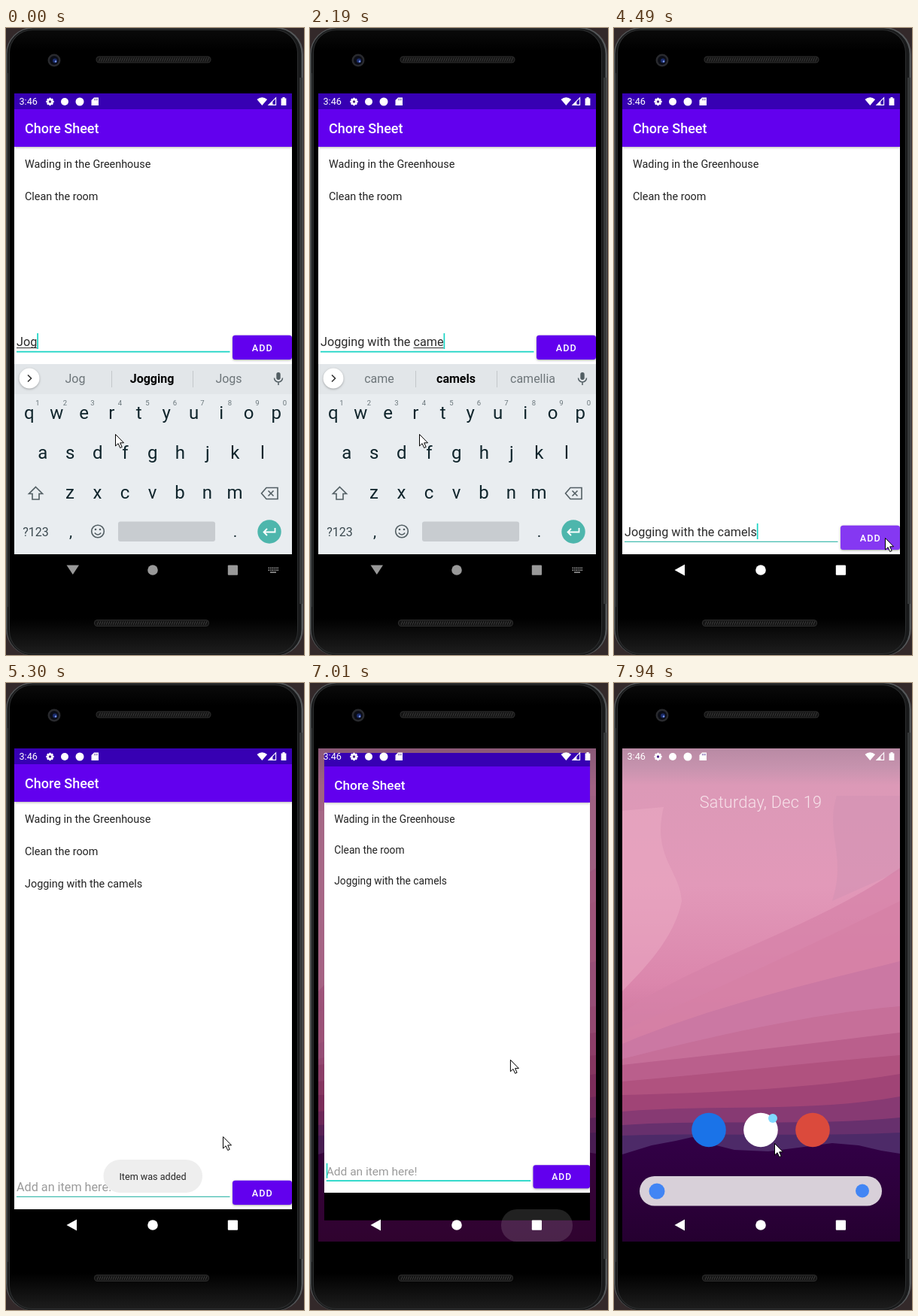
Recreate the animation shown at these times as an HTML page with a canvas. Size 396 by 834 pixels, loop 8000 ms.

```html
<!DOCTYPE html>
<html lang="en">
<head>
<meta charset="utf-8">
<title>Todo app demo</title>
<style>
html, body { margin: 0; width: 100%; height: 100%; overflow: hidden; background: #000; }
canvas { display: block; }
</style>
</head>
<body>
<canvas id="stage" width="396" height="834"></canvas>
<script>
const ctx = document.getElementById('stage').getContext('2d');
const LOOP = 8000;
const TITLE = 'Chore Sheet';
const SENTENCE = 'Jogging with the camels';
const ITEMS = ['Wading in the Greenhouse', 'Clean the room'];
const ALTERNATIVES = { Jogging: 'Jogs', with: 'within', the: 'then', camels: 'camellia' };

// Screen updates come in bursts: [first, last, count]
const BURSTS = [[0, 0, 1], [120, 1050, 8], [1200, 2190, 8], [2340, 2460, 2], [3010, 3940, 8],
  [4060, 4210, 2], [4490, 5420, 8], [5540, 6500, 8], [6620, 7640, 9], [7790, 7940, 2]];

const POINTER = [[2460, 145, 540], [3010, 142, 552], [3143, 132, 600], [3276, 112, 685], [3409, 103, 713],
  [3674, 103, 713], [3807, 190, 700], [3940, 284, 680], [4060, 340, 674], [4210, 360, 678],
  [4888, 360, 678], [5020, 335, 645], [5287, 288, 603], [5420, 295, 656], [5680, 308, 750],
  [5880, 313, 816], [6200, 306, 765], [6500, 300, 722], [6747, 300, 722], [6875, 292, 630], [7002, 266, 501],
  [7130, 235, 455], [7257, 210, 430], [7385, 206, 393], [7512, 204, 323], [7640, 206, 240],
  [7790, 211, 480], [7940, 213, 612]];
// time, scale, top of the app bar
const CARD = [[6875, 1, 108], [7002, .958, 111], [7130, .82, 138], [7257, .68, 166],
  [7385, .629, 172], [7512, .629, 104], [7640, .629, -130], [7790, .629, -400]];

function hold(time) {
  const [first, last, count] = BURSTS.findLast(b => b[0] <= time);
  const step = (last - first) / (count - 1 || 1) || 1;
  return Math.min(last, first + Math.floor((time - first + 36) / step) * step);
}

function tween(keys, t) {
  const i = keys.findIndex(k => k[0] > t);
  if (i === 0) return keys[0].slice(1);
  if (i < 0) return keys.at(-1).slice(1);
  const [a, b] = [keys[i - 1], keys[i]];
  const p = (t - a[0]) / (b[0] - a[0]);
  return a.slice(1).map((v, n) => v + (b[n + 1] - v) * p);
}

const ramp = (t, from, to) => Math.max(0, Math.min(1, (t - from) / (to - from)));

function layer(alpha, draw) {
  ctx.save();
  ctx.globalAlpha *= alpha;
  draw();
  ctx.restore();
}

function box(x, y, w, h, color, r = 0) {
  ctx.fillStyle = color;
  ctx.beginPath();
  ctx.roundRect(x, y, w, h, r);
  ctx.fill();
}

function disc(x, y, r, color) {
  ctx.fillStyle = color;
  ctx.beginPath();
  ctx.arc(x, y, r, 0, 7);
  ctx.fill();
}

function fillPath(d, color) {
  ctx.fillStyle = color;
  ctx.fill(new Path2D(d));
}

function strokePath(d, color, width = 1.6) {
  ctx.strokeStyle = color;
  ctx.lineWidth = width;
  ctx.stroke(new Path2D(d));
}

function text(s, x, y, size, color, align = 'left', weight = 400, spacing = 0) {
  ctx.font = `${weight} ${size}px Roboto, sans-serif`;
  ctx.letterSpacing = spacing + 'px';
  ctx.textAlign = align;
  ctx.fillStyle = color;
  ctx.fillText(s, x, y);
  return ctx.measureText(s).width;
}

function gradient(y0, y1, stops) {
  const g = ctx.createLinearGradient(0, y0, 0, y1);
  stops.forEach(([y, color]) => g.addColorStop((y - y0) / (y1 - y0), color));
  return g;
}

function shadow(color, blur, y) {
  ctx.shadowColor = color;
  ctx.shadowBlur = blur;
  ctx.shadowOffsetY = y;
}

function grille(x, y) {
  box(x, y, 153, 9, '#303030', 4.5);
  box(x + 1, y + 1, 151, 7, '#141414', 3.5);
  for (let i = 4; i < 150; i += 3) strokePath(`M${x + i} ${y + 7}l2-5`, '#3c3c3c', 1);
}

function phone() {
  box(0, 0, 396, 834, '#33292a');
  box(0, -1, 395, 836, '#55585a', 36);
  box(1.5, .5, 391, 834, '#191a1b', 34);
  box(4, 2, 384, 831, '#2c2e2f', 31);
  box(5, 3, 382, 829, gradient(3, 832, [[3, '#0a0a0a'], [30, '#000'], [785, '#000'], [832, '#1d1d1d']]), 30);
  box(390, 66, 4, 700, '#37393a');
  box(2, 60, 1, 710, '#303234');
  grille(119.5, 37.5);
  grille(117, 787);
  disc(64, 43, 8.5, '#292a2e');
  disc(64, 43, 6, '#0b0d16');
  disc(65, 43.5, 3, '#1c2d6b');
  disc(66, 44.5, 1.2, '#7f9cf0');
}

function statusIcons() {
  text('3:46', 17.5, 102.3, 12.6, '#fff');
  ctx.strokeStyle = '#fff';
  ctx.lineWidth = 2.4;
  for (let i = 0; i < 4; i++) {
    const a = i * Math.PI / 4, x = 5.2 * Math.cos(a), y = 5.2 * Math.sin(a);
    ctx.beginPath();
    ctx.moveTo(58.5 - x, 98 - y);
    ctx.lineTo(58.5 + x, 98 + y);
    ctx.stroke();
  }
  disc(58.5, 98, 4.2, '#fff');
  disc(58.5, 98, 1.7, '#4b238a');
  disc(78, 98, 5, '#fff');
  disc(98, 98, 5.5, '#fff');
  fillPath('M117 92.5h6v10.5h-9.5v-7z', '#fff');
  strokePath('M117.5 94v2.4M119.5 94v2.4M121.3 94v2.4', '#63449c', .8);
  fillPath('M333.5 95q6.8-5.4 13.6 0l-6.8 8z', '#fff');
  strokePath('M349 102.4h9.6v-9.6z', '#fff', 1.1);
  fillPath('M349 102.4l5.4-5.4v5.4z', '#fff');
  fillPath('M365.6 93.4h1.9v-1.4h3v1.4h1.9v9.6h-6.8z', '#fff');
}

function navIcons(down) {
  const color = down ? '#999' : '#fff';
  fillPath(down ? 'M80.5 714.5h16.5l-8.2 12.5z' : 'M94 713.5v15l-13.5-7.5z', color);
  disc(195, 721, 6.8, color);
  box(294.8, 714.5, 13.2, 13.2, color, 1);
  if (!down) return;
  for (let row = 0; row < 2; row++)
    for (let i = 0; i < 6; i++) box(348.5 + i * 2.4, 717.5 + row * 2.8, 1.5, 1.6, color);
  box(351, 723.2, 8, 1.6, color);
}

const navRipple = (x, alpha) => box(x, 700, 95, 43, `rgba(255,255,255,${alpha})`, 21);

function suggestions(typed) {
  const words = SENTENCE.split(' ');
  const parts = typed.split(' ');
  const word = words[parts.length - 1];
  const prefix = parts.at(-1);
  text(prefix || 'and', 92, 472, 16, '#6d7579', 'center');
  text(word, 194, 472, 16, '#000', 'center', 700);
  text(ALTERNATIVES[word], 296, 472, 16, '#6d7579', 'center');
  box(140, 456, 1, 22, '#c3c8cb');
  box(248, 456, 1, 22, '#c3c8cb');
}

function keyRow(keys, x, y) {
  [...keys].forEach((k, i) => text(k, x + i * 36.5, y, 24, '#10252c', 'center'));
}

function keyboard(typed, closing) {
  const ink = '#525e63';
  box(11, 447, 369, 40, '#e2e6e9');
  box(11, 487, 369, 213, '#e9edf0');
  layer(1, () => {
    shadow('rgba(0,0,0,.3)', 3, 1);
    disc(31, 466, 13.5, '#fff');
  });
  strokePath('M29 461.5l4.5 4.5-4.5 4.5', '#333');
  if (!closing) suggestions(typed);
  box(359.3, 458, 5.4, 10, ink, 2.7);
  strokePath('M356.5 465.5a5.5 5.5 0 0 0 11 0M362 471v4', ink, 1.5);
  keyRow('qwertyuiop', 30.7, 519.5);
  [...'1234567890'].forEach((n, i) => text(n, 42 + i * 36.5, 502, 9.5, '#69757a', 'center'));
  keyRow('asdfghjkl', 48.8, 572.5);
  keyRow('zxcvbnm', 85, 625.5);
  strokePath('M39.5 610.5l9 9h-4.5v7.5h-9v-7.5h-4.5z', ink);
  strokePath('M346 611.5h15v15h-15l-6.5-7.5zM348.5 615.5l7 7M355.5 615.5l-7 7', ink);
  text('?123', 39.5, 675.5, 16, '#3c4a50', 'center');
  text(',', 86, 677, 21, '#10252c', 'center');
  text('.', 304.5, 677, 21, '#10252c', 'center');
  strokePath('M130.3 669.5a8.3 8.3 0 1 1-16.6 0a8.3 8.3 0 1 1 16.6 0M117.8 671.5q4.2 5 8.4 0', ink);
  disc(119, 667, 1.3, ink);
  disc(125, 667, 1.3, ink);
  box(149, 656.5, 129, 26.5, '#c8ccd0', 3);
  disc(350, 670, 15.7, '#4db6ac');
  strokePath('M357.5 665v5.5h-14M347 666l-4.5 4.5 4.5 4.5', '#fff', 1.8);
}

function inputRow(t, typed, added, dy) {
  const focused = t < 3600 || t > 6600;
  const width = typed ? text(typed, 14, 423 + dy, 16.2, '#2b2b2b')
    : (text('Add an item here!', 14, 423 + dy, 16.2, '#9b9b9b'), 0);
  if (t < 3500) {
    const lead = typed.slice(0, typed.lastIndexOf(' ') + 1);
    const start = ctx.measureText(lead).width;
    box(14 + start, 425, width - start, 1, '#333');
  }
  const caretOn = !added || (Math.min(t, 7002) - 4600) % 1000 < 500;
  if (caretOn) box(14 + width, 406 + dy, 1.7, 21, '#18d4c4');
  box(14, 429.7 + dy, 283.5, focused ? 1.8 : 1.2, focused ? '#18d4c4' : '#45bdb0');
  layer(1, () => {
    shadow('rgba(0,0,0,.35)', 3, 1);
    box(301, 408.7 + dy, 79, 32.3, '#6200ee', 3.5);
  });
  if (t >= 4490 && t < 4950) box(301, 408.7 + dy, 79, 32.3, 'rgba(255,255,255,.22)', 3.5);
  text('ADD', 340.8, 429.7 + dy, 12.6, '#fff', 'center', 500, 1.1);
}

function app(t) {
  const added = t > 4600;
  const open = t < 3600;
  const count = t < 120 ? 3 : 4 + Math.floor((t - 120) / 121.7);
  const typed = added ? '' : SENTENCE.slice(0, count);

  box(11, 87, 369, 656, '#000');
  box(11, 108, 369, 592, '#fff');
  layer(1, () => {
    shadow('rgba(0,0,0,.3)', 3, 1);
    box(11, 108, 369, 50, '#6200ee');
  });
  box(11, 87, 369, 21, '#3700b3');
  text(TITLE, 25, 140, 18, '#fff', 'left', 500);
  (added ? [...ITEMS, SENTENCE] : ITEMS).forEach((item, i) =>
    text(item, 25, 185.7 + i * 43, 14.4, '#222'));
  inputRow(t, typed, added, open ? 0 : 253);

  const [slide, alpha] = tween([[3409, 0, 1], [3541, 8, .8], [3674, 36, .28], [3807, 60, 0]], t);
  if (alpha > 0) layer(alpha, () => {
    ctx.translate(0, slide);
    keyboard(typed, t > 3500);
  });

  const toast = ramp(t, 4640, 4888) * (1 - ramp(t, 6560, 6860));
  if (toast > 0) layer(toast, () => {
    box(129.5, 634, 131.5, 44, '#eee', 22);
    text('Item was added', 195, 661.2, 12.6, '#262626', 'center');
  });
}

// Band of the landscape: a curve across the screen, filled to the bottom
function ridge(left, bend1, bend2, right, color) {
  fillPath(`M11 ${left}C130 ${bend1} 260 ${bend2} 380 ${right}V743H11z`, color);
}

function wallpaper() {
  box(11, 87, 369, 656, gradient(87, 743, [[87, '#b98aa4'], [112, '#c693ae'], [136, '#dc99b7'],
    [270, '#e299b9'], [400, '#db86ac'], [520, '#c06a93'], [743, '#c06a93']]));
  fillPath('M11 170L66 165C50 230 88 250 90 290C80 340 40 380 11 410z', 'rgba(236,170,196,.55)');
  fillPath('M296 150H380V250L290 290C310 230 280 200 296 150z', 'rgba(210,146,180,.5)');
  ridge(438, 360, 330, 246, 'rgba(214,130,168,.7)');
  ridge(462, 410, 350, 290, 'rgba(214,128,166,.7)');
  ridge(480, 430, 400, 370, '#cb78a3');
  ridge(500, 470, 440, 430, '#c66f99');
  ridge(508, 495, 480, 465, '#ba5f8c');
  ridge(530, 520, 505, 495, '#b0527f');
  ridge(548, 545, 540, 520, '#a04476');
  ridge(570, 560, 572, 550, '#873a73');
  ridge(588, 580, 590, 578, '#67306d');
  ridge(602, 598, 604, 598, '#4d2a68');
  fillPath('M11 627L50 615 82 609 104 604 128 613 160 621 205 623 245 618 290 612 325 615 355 622 380 626V743H11z',
    gradient(604, 743, [[604, '#320047'], [680, '#2c003b'], [743, '#250030']]));
}

function dock() {
  disc(126, 594.5, 22.8, '#1a73e8');
  disc(195, 594.5, 22.8, '#fff');
  disc(211, 579, 6, '#80d8ff');
  disc(264, 594.5, 22.8, '#db4a3c');
  box(34, 656, 322, 39.5, '#d8d0d9', 19.75);
  disc(57, 676, 10.5, '#4285f4');
  disc(330, 675.5, 9, '#4285f4');
}

function home(t) {
  const shade = 1 - ramp(t, 7640, 7940);
  wallpaper();
  box(11, 87, 369, 656, `rgba(64,10,46,${.38 * shade})`);
  layer(ramp(t, 7002, 7257), dock);
  layer(1 - shade, () => text('Saturday, Dec 19', 195, 165.7, 21.6, '#f7e2ea', 'center', 300, .3));
}

function appCard(t) {
  const [scale, top] = tween(CARD, t);
  if (top < -380) return;
  const chrome = 1 - ramp(t, 7002, 7257);
  const y = 108 - 19 * chrome;
  ctx.save();
  ctx.translate(195.5, top);
  ctx.scale(scale, scale);
  ctx.translate(-195.5, -108);
  ctx.beginPath();
  ctx.roundRect(11, y, 369, 700 + 38.6 * chrome - y, 9 * (1 - chrome));
  ctx.clip();
  app(t);
  ctx.restore();
  layer(ramp(t, 7200, 7385), () => disc(195.3, top, 19.5, '#3ddc84'));
}

function pointer(t) {
  const [x, y] = tween(POINTER, t);
  ctx.save();
  ctx.translate(x + .5, y + .5);
  const arrow = 'M0 0V15.5L3.6 12.2 6.2 18 8.7 16.9 6.2 11.3H11z';
  fillPath(arrow, '#fff');
  strokePath(arrow, '#000', 1);
  ctx.restore();
}

function render(t) {
  phone();
  ctx.save();
  ctx.beginPath();
  ctx.rect(11, 87, 369, 656);
  ctx.clip();
  if (t < 6900) {
    app(t);
  } else {
    home(t);
    appCard(t);
  }
  statusIcons();
  if (t > 3400 && t < 3800) navRipple(40.5, .17);
  if (t > 6600 && t < 7250) navRipple(254, .13 * (1 - ramp(t, 7010, 7250)));
  navIcons(t < 3600);
  ctx.restore();
  pointer(t);
}

function tick() {
  render(hold(performance.now() % LOOP));
  requestAnimationFrame(tick);
}
tick();
</script>
</body>
</html>
```
